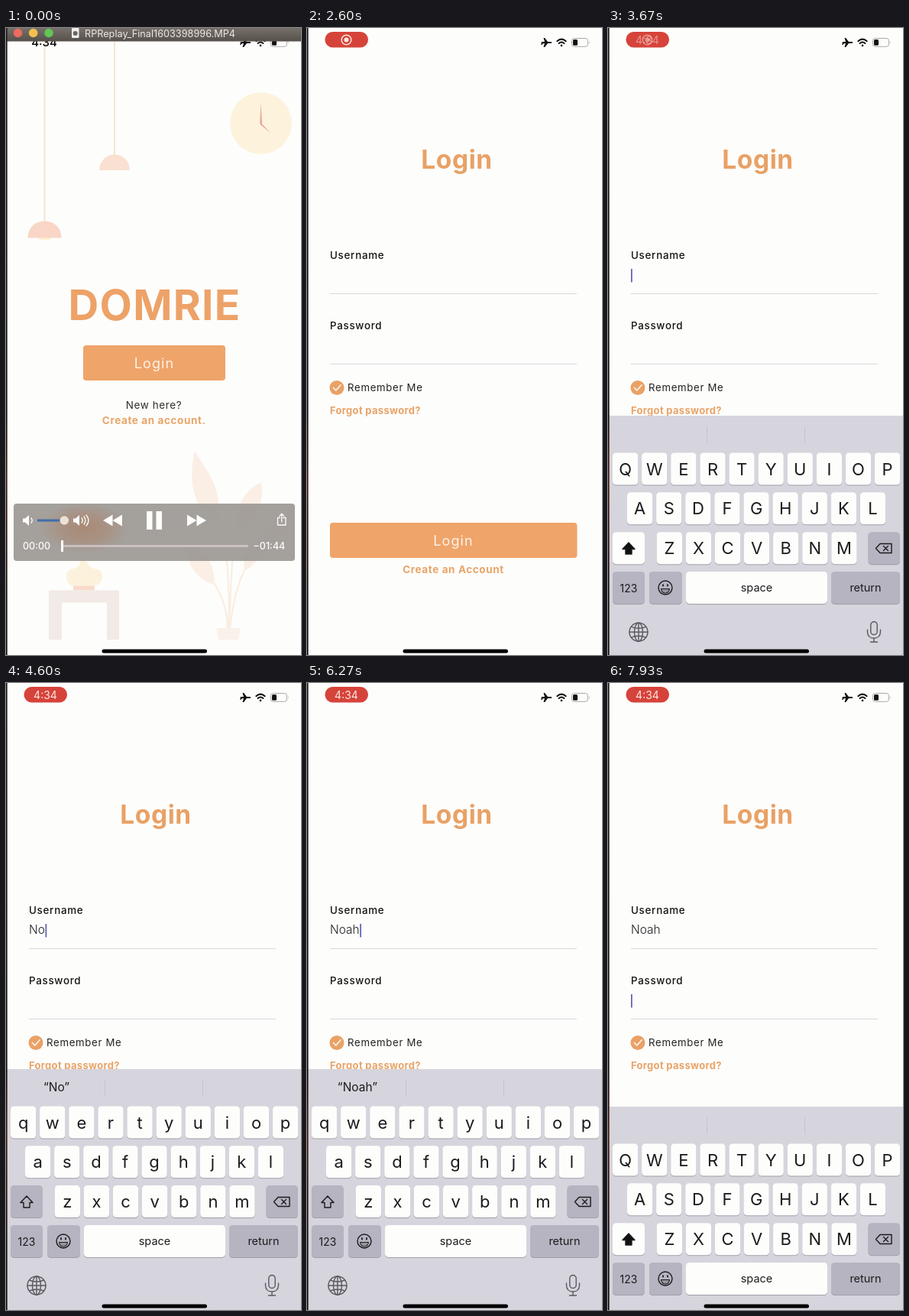
An HTML page that plays this animation: 386x820 px, repeating every 8000 ms.

```html
<!DOCTYPE html>
<html lang="en">
<head>
<meta charset="utf-8">
<title>Login screen recording</title>
<style>
  html, body { margin: 0; width: 100%; height: 100%; overflow: hidden; background: #fdfdfc; }
  svg { display: block; width: 100%; height: 100%; }
  text { font-family: Inter, "Open Sans", sans-serif; white-space: pre; }
  .mid { text-anchor: middle; }
  .link { font-weight: 700; font-size: 13.5px; letter-spacing: .6px; fill: #e8a468; }
  .label { font-size: 13.4px; font-weight: 500; letter-spacing: .7px; fill: #16140f; }
  .button { font-size: 18px; letter-spacing: 1.1px; fill: #fdf3e8; }
  .value { font-size: 15.5px; font-weight: 300; fill: #222; }
  .leaf { fill: #fbefe5; }
  .line { fill: none; stroke-linecap: round; stroke-linejoin: round; }
</style>
</head>
<body>
<svg viewBox="0 0 386 820" preserveAspectRatio="none">
  <defs>
    <linearGradient id="bar" x2="0" y2="1"><stop stop-color="#77706a"/><stop offset="1" stop-color="#56504b"/></linearGradient>
    <linearGradient id="edge" x2="0" y2="1">
      <stop stop-color="#24201e"/><stop offset=".62" stop-color="#1c1715"/><stop offset=".72" stop-color="#4a2218"/><stop offset=".9" stop-color="#1c1715"/>
    </linearGradient>
    <radialGradient id="glow"><stop stop-color="#ad7f62" stop-opacity=".65"/><stop offset=".55" stop-color="#ad7f62" stop-opacity=".4"/><stop offset="1" stop-color="#ad7f62" stop-opacity="0"/></radialGradient>
  </defs>
  <rect width="386" height="820" fill="#fdfdfc"/>

  <g id="home">
    <path d="M50.5 0V253M142 0V166" stroke="#f4e6cb" stroke-width="2"/>
    <ellipse cx="50.5" cy="274" rx="9" ry="3.5" fill="#fdf0d2"/>
    <path d="M28.5 274.5C29 245 72 245 72.5 274.5Z" fill="#f9d6c6"/>
    <path d="M122 186C123 158.500 161 158.500 162 186Z" fill="#f9e0d0"/>
    <circle cx="333.5" cy="124.5" r="40.5" fill="#fdf3dd"/>
    <path d="M333.5 97L335 125H332.2ZM333 123.5L346.5 137.5L333 126.5Z" fill="#e8a893"/>

    <path d="M78 622.5H125L130.5 684H72Z" fill="#fae1d0"/>
    <path d="M98.5 684H104.5C104 698 107 704 113 706.5C123 707 126 712 126 717C126 725 121 729.5 113 729.5H91C83 729.5 79 725 79 717C79 712 82 707 91 706.5C96 704 99 698 98.5 684Z" fill="#fcf2dc"/>
    <rect x="88" y="729.5" width="28" height="6" fill="#f9dacb"/>
    <path d="M56 735.5H148V800H132V751.5H73V800H56Z" fill="#f2eae6"/>

    <path class="line" d="M280 646C291 690 293 740 291 787M301 656C293 700 295 750 291 787M273 727C284 745 290 765 290 787M312 709C300 735 296 760 293 787" stroke="#f9eee2" stroke-width="2.2"/>
    <path class="leaf" d="M247 553C260 577 281 592 280 647C253 638 235 605 247 553Z"/>
    <path class="leaf" d="M334 594C338 622 328 645 301 657C298 630 310 605 334 594Z"/>
    <path class="leaf" d="M374 627C374 656 357 681 336 681C331 696 322 705 312 710C310 690 312 674 330 671C337 650 355 641 374 627Z"/>
    <path class="leaf" d="M236 670C260 682 272 697 273 728C249 722 234 700 236 670Z"/>
    <path d="M275 785H307L304 800H278Z" fill="#faf1ea"/>

    <text class="mid" x="194.5" y="382" font-size="55" font-weight="700" letter-spacing="1.3" fill="#eda268">DOMRIE</text>
    <rect x="101" y="415" width="186" height="46" rx="4" fill="#efa46a"/>
    <text class="mid button" x="194" y="445">Login</text>
    <text class="mid" x="193.5" y="498" font-size="13.5" letter-spacing=".6" fill="#302e2a">New here?</text>
    <text class="mid link" x="193.7" y="518">Create an account.</text>
  </g>

  <g id="login">
    <rect width="386" height="820" fill="#fdfdfc"/>
    <text class="mid" x="196" y="184" font-size="33.5" font-weight="700" letter-spacing=".6" fill="#e9a165">Login</text>
    <text class="label" x="30" y="302">Username</text>
    <text class="label" x="30" y="394">Password</text>
    <path d="M30 347.5H353M30 439.5H353" stroke="#d9d9d9"/>
    <text id="name" class="value" x="30" y="328"></text>
    <rect id="caret" width="1.8" height="17.5" fill="#6565b5"/>
    <circle cx="39" cy="470.5" r="9.5" fill="#eaa166"/>
    <path class="line" d="M34.5 470.5L37.8 474L44 467" stroke="#fdf6ee" stroke-width="1.7"/>
    <text x="53" y="475" font-size="13.2" letter-spacing=".7" fill="#24221e">Remember Me</text>
    <text class="link" x="30" y="505" style="font-size: 13px; letter-spacing: .3px">Forgot password?</text>
    <rect x="30" y="647" width="323.5" height="46" rx="4" fill="#efa46a"/>
    <text class="mid button" x="191.5" y="677">Login</text>
    <text class="mid link" x="191.5" y="713">Create an Account</text>
  </g>

  <g id="keyboard"></g>

  <text id="clock" class="mid" x="50" y="23.5" font-size="15" font-weight="500">4:34</text>
  <g id="pill">
    <rect x="23.5" y="5" width="56.5" height="20.5" rx="10" fill="#d6433a"/>
    <g id="record" stroke="#fbe9e4" fill="none"><circle cx="51.5" cy="15.5" r="6.3" stroke-width="1.5"/><circle cx="51.5" cy="15.5" r="3" fill="#fbe9e4" stroke="none"/></g>
    <text id="pillTime" class="mid" x="51.5" y="20.7" font-size="14" fill="#fbe9e4">4:34</text>
  </g>
  <path d="M306.5 18.2L311 18L309.5 13H311.2L315 18H318.5Q320.5 18.2 320.5 19Q320.5 19.9 318.5 20.1H315L311.2 25H309.5L311 20.1L308.8 20.2L307.2 22H306.2L306.8 19Z" fill="#111"/>
  <g class="line" stroke="#111" stroke-width="2"><path d="M327.3 17.2Q333 12 338.7 17.2M329.6 20Q333 16.9 336.4 20"/><path d="M333 23V22.8" stroke-width="2.6"/></g>
  <rect x="346.5" y="13.5" width="21" height="10.8" rx="3" fill="none" stroke="#aaa9a8"/>
  <rect x="348" y="15" width="6" height="7.8" rx="1.5" fill="#111"/>
  <path d="M369 17V21Q370.5 19 369 17Z" fill="#aaa9a8"/>
  <rect x="125.5" y="812.5" width="137.5" height="5" rx="2.5"/>

  <g id="player">
    <rect width="386" height="17.5" fill="url(#bar)"/>
    <circle cx="15.5" cy="6.5" r="5.8" fill="#ed6a5e"/><circle cx="35.7" cy="6.5" r="5.8" fill="#f4bf4f"/><circle cx="56" cy="6.5" r="5.8" fill="#61c554"/>
    <rect x="86" width="9.5" height="13" rx="1" fill="#f0eeec"/><circle cx="90.7" cy="7" r="3" fill="#686664"/>
    <text class="mid" x="201.5" y="11.5" font-size="12.7" fill="#ebe8e5">RPReplay_Final1603398996.MP4</text>

    <rect x="10" y="622" width="368" height="75" rx="4" fill="#a29d99" fill-opacity=".97"/>
    <ellipse cx="102" cy="654" rx="58" ry="32" fill="url(#glow)"/>
    <g fill="#fdfdfc">
      <path d="M22 641.5H25L30 637V651L25 646.5H22ZM88 641.5H91L96 637V651L91 646.5H88Z"/>
      <path d="M139.5 636.5V651.5L127 644ZM152 636.5V651.5L139.5 644ZM237 636.5V651.5L249.5 644ZM249.5 636.5V651.5L262 644Z"/>
      <rect x="184" y="632" width="7.5" height="24"/><rect x="196.5" y="632" width="7.5" height="24"/>
      <text x="22" y="682" font-size="12.5" font-weight="500">00:00</text>
      <text x="323.5" y="682" font-size="12.5" font-weight="500">−01:44</text>
    </g>
    <g class="line" stroke="#fdfdfc" stroke-width="1.3"><path d="M33 641Q35.5 644 33 647M99 641Q101.5 644 99 647M102 639Q106 644 102 649M105 637Q111 644 105 651M358.5 640.5H355.5V650H366V640.5H363M360.8 646V635.5M358 638.2L360.8 635.3L363.6 638.2"/></g>
    <path d="M41 644H76" stroke="#416da9" stroke-width="3"/><circle cx="76.3" cy="644" r="5.8" fill="#eee0d4"/>
    <path d="M75 677.5H317" stroke="#d0c6c6" stroke-width="2.5"/><rect x="72" y="670" width="3" height="15" fill="#fdfdfc"/>
  </g>
  <rect width="1.7" height="820" fill="url(#edge)"/>
</svg>
<script>
const LOOP = 8000, NAME = "Noah";
const KEY_TIMES = [4130, 4530, 4870, 5200];
const PUSH = 1820, FOCUS_NAME = 3280, RETURN = 6869, FOCUS_PASSWORD = 7749;
const KEYBOARD_TOP = 505, KEYBOARD_HEIGHT = 315;
const WHITE = "#fdfdfc", GREY = "#b5b4c0", INK = "#1b1b1d";

const $ = id => document.getElementById(id);
const ramp = (t, from, to) => Math.min(1, Math.max(0, (t - from) / (to - from)));
const show = (id, opacity) => $(id).setAttribute("opacity", opacity);
const move = (id, x, y) => $(id).setAttribute("transform", `translate(${x} ${y})`);
const setText = (node, value) => { if (node.textContent !== value) node.textContent = value; };

// Critically damped spring from 0 to 1.
function spring(t, start) {
  const u = Math.max(0, t - start) * 0.01826;
  return 1 - (1 + u) * Math.exp(-u);
}

function key(x, row, width, fill = WHITE, content = "", id = "") {
  const y = 48.5 + row * 51.8;
  return `<rect x="${x}" y="${y + 1}" width="${width}" height="42" rx="4.5" fill="#a09fa8"/>
    <rect ${id && `id="${id}"`} x="${x}" y="${y}" width="${width}" height="42" rx="4.5" fill="${fill}"/>${content}`;
}
const caption = (x, y, size, value, attrs = "") =>
  `<text class="mid" x="${x}" y="${y}" font-size="${size}" fill="${INK}" ${attrs}>${value}</text>`;

function buildKeyboard() {
  const pitch = 38.1;
  const letters = [["qwertyuiop", 6], ["asdfghjkl", 25], ["zxcvbnm", 63.7]].map(([row, left], r) =>
    [...row].map((c, i) => {
      const x = left + i * pitch;
      return key(x, r, 33.3, WHITE, caption(x + 16.7, 77.5 + r * 51.8, 22, c, "data-letter"));
    }).join("")).join("");
  $("keyboard").innerHTML = `
    <rect width="386" height="340" fill="#d6d4dc"/>
    <path d="M129.5 14V36M257.5 14V36" stroke="#c5c3cb"/>
    ${caption(66, 29, 15.5, "", 'id="suggestion"')}${letters}
    ${key(6, 2, 42, GREY, "", "shiftKey")}${key(340.5, 2, 41.5, GREY)}
    ${key(6, 3, 42, GREY, caption(27, 230.5, 14, "123"))}${key(54, 3, 43, GREY)}
    ${key(102, 3, 185, WHITE, caption(194.5, 230, 14.5, "space"))}
    ${key(292, 3, 90, GREY, caption(337, 230, 14.5, "return"))}
    <g class="line" stroke="${INK}" stroke-width="1.4">
      <path id="shift" d="M27 166L35 174.5H31V181H23V174.5H19Z"/>
      <path d="M350.5 173.5L356 167.5H371V179.5H356ZM360.5 170.5L366.5 176.5M366.5 170.5L360.5 176.5"/>
      <circle cx="75" cy="225" r="9"/>
      <path d="M69.5 226.5H80.5Q79.5 232 75 232Q70.5 232 69.5 226.5Z" fill="${INK}" fill-opacity=".2" stroke-width="1.1"/>
      <path d="M72 221V222.5M78 221V222.5" stroke-width="1.8"/>
    </g>
    <g class="line" stroke="#5a5960" stroke-width="1.4">
      <circle cx="40" cy="283" r="12"/><ellipse cx="40" cy="283" rx="5.5" ry="12"/>
      <path d="M28 283H52M40 271V295M30.5 276Q40 280 49.5 276M30.5 290Q40 286 49.5 290"/>
      <rect x="343.8" y="269.5" width="8.4" height="17" rx="4.2"/>
      <path d="M339.5 280V283Q340 291 348 291Q356 291 356.5 283V280M348 291V296M343.5 296H352.5"/>
    </g>`;
}
buildKeyboard();
const letterNodes = [...document.querySelectorAll("[data-letter]")];

function render(t) {
  show("player", 1 - ramp(t, 350, 800));
  show("pill", ramp(t, 780, 950));
  show("clock", 1 - ramp(t, 780, 950));
  const timeMix = ramp(t, 3500, 3840);
  show("record", 1 - timeMix);
  show("pillTime", timeMix);

  const push = spring(t, PUSH);
  move("home", -116 * push, 0);
  move("login", 386 * (1 - push), 0);

  const raised = t >= FOCUS_PASSWORD ? spring(t, FOCUS_PASSWORD)
    : t >= RETURN ? 1 - spring(t, RETURN) : spring(t, FOCUS_NAME);
  move("keyboard", 0, KEYBOARD_TOP + KEYBOARD_HEIGHT * (1 - raised));

  const count = KEY_TIMES.filter(time => t >= time).length;
  const typed = NAME.slice(0, count);
  setText($("name"), typed);
  setText($("suggestion"), count && t < RETURN ? `“${typed}”` : "");

  const onPassword = t >= FOCUS_PASSWORD;
  const caps = count === 0 || onPassword;
  for (const node of letterNodes) {
    const c = node.textContent;
    setText(node, caps ? c.toUpperCase() : c.toLowerCase());
  }
  $("shiftKey").setAttribute("fill", caps ? WHITE : GREY);
  $("shift").setAttribute("fill", caps ? "#111" : "none");

  const focused = onPassword || (t >= FOCUS_NAME && t < RETURN);
  const blinkStart = onPassword ? FOCUS_PASSWORD : count ? KEY_TIMES[count - 1] : FOCUS_NAME;
  show("caret", focused && (t - blinkStart) % 1000 < 550 ? 1 : 0);
  const caretX = onPassword || !count ? 30 : 30.5 + $("name").getComputedTextLength();
  move("caret", caretX, onPassword ? 407 : 315);
}

function tick() {
  render(performance.now() % LOOP);
  requestAnimationFrame(tick);
}
tick();
</script>
</body>
</html>
```
